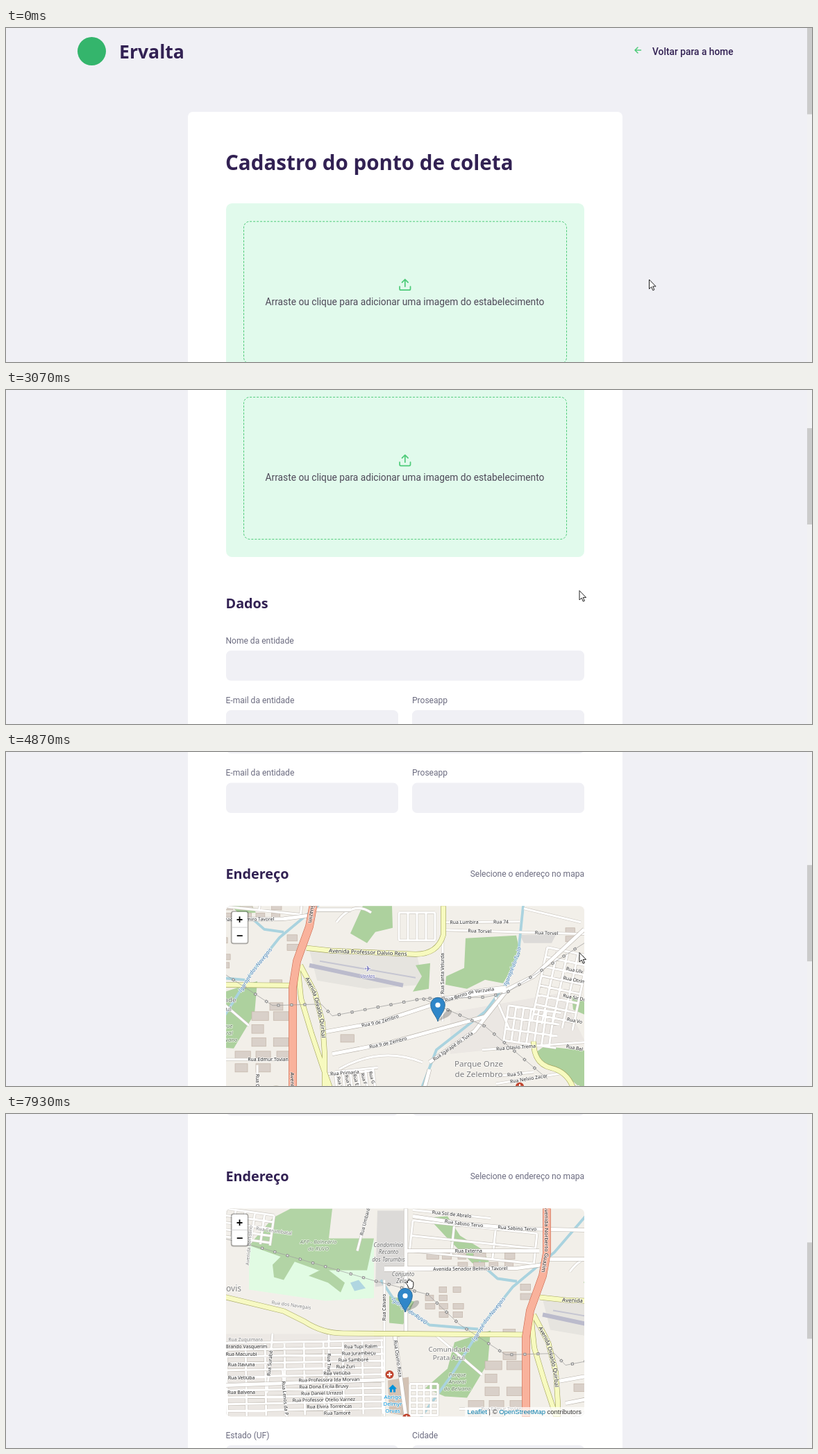
These frames come from a looping animation (1161 px wide and 482 px high, 8000 ms). An HTML page:

```html
<!DOCTYPE html>
<html lang="pt-BR">
<head>
<meta charset="utf-8">
<title>Cadastro do ponto de coleta</title>
<style>
html, body { margin: 0; width: 100%; height: 100%; overflow: hidden; background: #f0f0f5; }
svg { display: block; }
#stage { width: 1161px; height: 482px; }
text { font-family: Roboto, sans-serif; }
.head { font-family: "Noto Sans", sans-serif; font-weight: 700; fill: #322153; }
.h2 { font-size: 19.8px; }
.label { font-size: 12.04px; fill: #6c6c80; }
.line { fill: none; stroke: #4ecb79; stroke-linecap: round; stroke-linejoin: round; }
.field { fill: #f0f0f5; }
.btn { font: 700 15px "DejaVu Sans Mono", monospace; text-anchor: middle; }
.attr { font: 9.46px "Liberation Sans", Arial, sans-serif; text-anchor: end; fill: #333; }
.attr tspan { fill: #0078a8; }
#world text { font-family: "Noto Sans", sans-serif; text-anchor: middle; paint-order: stroke;
  stroke: #fff; stroke-opacity: .75; stroke-width: 1.6px; stroke-linejoin: round; fill: #222; }
#world .area { fill: #777; }
#world .water { fill: #4d80b3; font-style: italic; }
#world .wood { fill: #5f7a57; font-style: italic; }
#world .estate { fill: #666; font-style: italic; }
#world .airport { fill: #6a6ab5; font-style: italic; }
#world .shelter { fill: #0092da; }
#world .plane { font-family: "DejaVu Sans", sans-serif; fill: #7a7ac0; }
</style>
</head>
<body>
<svg id="stage" viewBox="0 0 1161 482">
  <defs>
    <clipPath id="frame"><rect x="317" y="136.5" width="516" height="300" rx="7"/></clipPath>
  </defs>
  <rect width="1161" height="482" fill="#f0f0f5"/>
  <g id="page">
    <circle cx="123.5" cy="33.5" r="20.5" fill="#34b56c"/>
    <text class="head" x="163" y="44" font-size="26.6">Ervalta</text>
    <path class="line" stroke-width="1.5" d="M914.5 32H906M910 28l-4 4 4 4"/>
    <text x="931" y="38.5" font-size="13.76" font-weight="500" fill="#322153">Voltar para a home</text>
    <rect x="262" y="121" width="626" height="1600" rx="7" fill="#fff"/>
    <text class="head" x="316" y="205" font-size="29.6">Cadastro do ponto de coleta</text>
    <rect x="317" y="253" width="516" height="257" rx="8.6" fill="#e1faec"/>
    <rect class="line" x="342.5" y="279.2" width="465" height="205" rx="8.6" style="stroke-linecap:butt" stroke-dasharray="3 2"/>
    <path class="line" stroke-width="2" transform="translate(564.5 360.2) scale(.858)"
      d="M21 15v4a2 2 0 0 1-2 2H5a2 2 0 0 1-2-2v-4M17 8l-5-5-5 5M12 3v12"/>
    <text x="574.5" y="400.3" font-size="13.76" fill="#4e4958" text-anchor="middle">Arraste ou clique para adicionar uma imagem do estabelecimento</text>
    <text class="head h2" x="316.5" y="584">Dados</text>
    <text class="label" x="316.5" y="634.8">Nome da entidade</text>
    <rect class="field" x="317" y="645" width="516" height="43.5" rx="7"/>
    <text class="label" x="316.5" y="720.6">E-mail da entidade</text>
    <text class="label" x="585" y="720.6">Proseapp</text>
    <rect class="field" x="317" y="731" width="248" height="43.5" rx="7"/>
    <rect class="field" x="585" y="731" width="248" height="43.5" rx="7"/>
    <text class="head h2" x="316.5" y="869.5">Endereço</text>
    <text class="label" x="833" y="866.6" text-anchor="end">Selecione o endereço no mapa</text>
    <g transform="translate(0 772.2)">
      <g clip-path="url(#frame)">
        <g id="world"></g>
        <rect id="tile" x="317" y="136" width="213" height="195" fill="#f2efe9"/>
        <g id="pin">
          <path d="M0 0 13-16q8-3 7 3-3 6-9 8z" fill="#000" opacity=".22"/>
          <path d="M0 0C-1.5-7-10.3-14-10.3-24.2a10.3 10.3 0 0 1 20.6 0C10.3-14 1.5-7 0 0z" fill="#2f86c9" stroke="#2e6c97"/>
          <circle cy="-23.6" r="3.6" fill="#fff"/>
        </g>
        <rect x="661" y="423" width="172" height="14" fill="#fff" opacity=".7"/>
        <text class="attr" x="829" y="433"><tspan>Leaflet</tspan> | © <tspan>OpenStreetMap</tspan> contributors</text>
        <rect x="323.8" y="143.5" width="25.6" height="48" rx="4" opacity=".3"/>
        <rect x="325.5" y="145" width="22.3" height="44.6" rx="2.5" fill="#fff"/>
        <path d="M325.5 167.3h22.3" stroke="#ccc" stroke-width=".9"/>
        <text class="btn" x="336.4" y="161.5">+</text>
        <text class="btn" x="336.4" y="183.8">−</text>
      </g>
    </g>
    <text class="label" x="316.5" y="1240.4">Estado (UF)</text>
    <text class="label" x="585" y="1240.4">Cidade</text>
    <rect class="field" x="317" y="1250.2" width="248" height="43.5" rx="7"/>
    <rect class="field" x="585" y="1250.2" width="248" height="43.5" rx="7"/>
  </g>
  <rect x="1154" width="7" height="482" fill="#f1f1f3"/>
  <rect id="thumb" x="1154" width="7" height="139" fill="#cbcbcb"/>
  <g id="cursor" fill="#fff" stroke="#222" stroke-linejoin="round">
    <path id="arrow" d="M.5.5V14l3.1-2.9 2.2 5 2.1-.9-2.2-4.8h4.4z"/>
    <path id="hand" d="M-4 1L-6.5-1.8Q-6-4-4-2.3L-3.5-1.8V-5Q-2.5-6.5-1.5-5V-6Q-.5-7.5.5-6V-5.2Q1.8-6.6 2.6-5V-3.5Q4-4.5 4.8-3V2L3.5 6.5H-1.5z"/>
  </g>
</svg>
<script>
const $ = id => document.getElementById(id);
let seed = 7;
const random = () => (seed = seed * 16807 % 2147483647) / 2147483647;

// --- Map: helpers collect shapes into layers ---
const KINDS = {
  minor: { width: 3, fill: '#fff', edge: '#cbc6bf' },
  main: { width: 5, fill: '#fff', edge: '#b8b2aa' },
  yellow: { width: 6.5, fill: '#f7fabf', edge: '#a3a45c' },
  trunk: { width: 10.5, fill: '#f9b29c', edge: '#cc6a4f' },
  water: { width: 2.6, fill: '#aad3df', edge: '#aad3df' }
};
const paths = { water: '', minor: '', main: '', yellow: '', trunk: '' };
let ground = '', houses = '', labels = '', guides = '', count = 0;

const stroke = (d, color, width, extra = '') =>
  `<path d="${d}" fill="none" stroke="${color}" stroke-width="${width}" stroke-linejoin="round" ${extra}/>`;
const area = (fill, d) => { ground += `<path fill="${fill}" d="${d}z"/>`; };

// Names sit on their street, each at a share of its length
function road(kind, d, ...names) {
  paths[kind] += d;
  if (!names.length) return;
  const id = 'way' + count++;
  const size = kind === 'minor' || kind === 'main' ? 6.9 : 7.9;
  guides += `<path id="${id}" d="${d}"/>`;
  for (const [name, at = 50] of names)
    labels += `<text class="${kind}" font-size="${size}" dy="${size * .35}"><textPath href="#${id}" startOffset="${at}%">${name}</textPath></text>`;
}

function tag(cls, size, x, y, lines, turn = 0) {
  lines.forEach((s, i) => {
    labels += `<text class="${cls}" font-size="${size}" transform="translate(${x} ${y + i * size * 1.27}) rotate(${turn})" y="${size * .35}">${s}</text>`;
  });
}

function grid(x, y, w, h, deg, gapX, gapY) {
  const c = Math.cos(deg * Math.PI / 180), s = Math.sin(deg * Math.PI / 180);
  const at = (u, v) => `${(x + u * c - v * s).toFixed(1)} ${(y + u * s + v * c).toFixed(1)}`;
  for (let u = 0; u <= w; u += gapX) paths.minor += `M${at(u, 0)}L${at(u, h)}`;
  for (let v = 0; v <= h; v += gapY) paths.minor += `M${at(0, v)}L${at(w, v)}`;
}

// Loose rows of buildings inside a box
function build(x, y, w, h, size) {
  for (let u = x; u < x + w; u += size * 1.25)
    for (let v = y; v < y + h; v += size * .75)
      if (random() < .75)
        houses += `<rect x="${u}" y="${v}" width="${size * (.6 + random() * .4)}" height="${size * .5}"/>`;
}

const WOOD = '#add19e', PARK = '#dffce2', GREY = '#dcdad8';
area('#ebe7e3', 'M-200 250H205V600H-200');
area('#ebe7e3', 'M640 290L800 262 833 330 640 350');
area('#e6e4df', 'M437 200L592 208 602 250 520 256 448 244');
area(GREY, 'M199 72H239L240 176 196 182');
area(GREY, 'M740 178H792L786 190H746');
area('#d3c2b4', 'M214 317L244 312 247 369 216 364');
area(PARK, 'M14 116L114 122 194 113V198L124 202 14 186');
area(WOOD, 'M49 82L74 69H134L129 112H194L184 158H114L14 122');
area(WOOD, 'M48 150L70 128 82 142 64 172 50 168');
area(WOOD, 'M100 166L124 154 152 176 146 190 128 176');
area('#aad3df', 'M160 176L172 172 182 184 166 188');
area(WOOD, 'M272 82L300 80 318 108 350 128 360 146 336 148 300 112');
area(WOOD, 'M216 195L252 203 236 236 216 234');
area(WOOD, 'M310 262L362 245 358 292 328 342 296 340 268 328 300 300');
area(WOOD, 'M514 136H556L557 168 532 174 520 190 496 176 506 154');
area(WOOD, 'M662 183L735 179 741 206 716 248 690 243 664 256 633 250 634 238 660 226');
area(WOOD, 'M590 222L611 219 609 256 586 260 599 238');
area(WOOD, 'M775 339L833 345V404L806 380 772 366 763 348');
area(WOOD, 'M815 268L833 274V293L817 286');

build(354, 289, 50, 46, 25);
build(330, 346, 70, 24, 24);
build(380, 243, 26, 36, 22);
build(270, 133, 125, 14, 18);
build(268, 182, 48, 38, 16);
build(405, 178, 16, 18, 18);
build(482, 322, 16, 14, 22);
build(806, 168, 18, 24, 16);
houses += '<rect x="376" y="396" width="26" height="42" rx="12" fill="#c8e3b2"/><rect x="382" y="402" width="14" height="30" rx="7" fill="#d8b98a"/>';

// Neighbourhoods in view, then the outskirts seen when zoomed out
grid(-19, 263, 226, 106, -1, 28, 9.8);
grid(-19, 69, 70, 44, 8, 14, 10);
grid(724, 280, 76, 52, 8, 11, 17);
grid(780, 196, 60, 110, 12, 15, 14);
grid(246, 322, 40, 46, 0, 10, 9);
grid(250, 86, 180, 44, 6, 60, 22);
grid(474, 376, 62, 38, -6, 11, 38);
grid(566, 146, 52, 40, 0, 13, 40);
for (let x = -190; x < 820; x += 148)
  for (const y of [-12, 450]) grid(x, y, 140, 66 + y / 8, random() * 12 - 6, 14 + random() * 10, 12);
for (let y = 60; y < 440; y += 130) grid(-190, y, 160, 118, random() * 10 - 5, 18, 11);

road('water', 'M190 590L240 400 304 312 354 232 394 182 454 132 497 82 560 0', ['Igarapé dos Navegais', 57]);
road('water', 'M204 172L224 202 274 237 344 243', ['Igarapé do RUVO', 37]);
road('water', 'M570 590L600 396 620 344 690 289 720 249 738 204 745 136 748 -20', ['Igarapé do Tuvla', 63]);
road('water', 'M345 146L372 170 400 174');

road('trunk', 'M443 -20V133L437 166 419 216 413 254V590', ['Avenida Norberto Guazim', 21.7], ['Avenida Bertolino', 70.6]);
road('yellow', 'M-195 160L-19 197 64 217 94 232Q120 249 150 249L412 251');
road('yellow', 'M433 197L470 201 590 206Q622 206 630 178V-20', ['Avenida Professor Dalvio Rens', 21.7]);
road('yellow', 'M420 222L425 270 440 320 455 365 480 436 530 590', ['Avenida Só', 54]);
road('yellow', 'M424 222L445 262 456 305 459 350V590', ['Avenida Orvaldo Quirbal', 17.5]);
road('yellow', 'M760 332Q760 364 785 370T818 402L826 440 830 590');

road('main', 'M209 157L400 155 438 150', ['Avenida Senador Belmiro Tavorel', 54]);
road('main', 'M317 155H209M240 -20V249L224 252M-190 330L209 316M443 142H497M632 270L720 258L760 238 833 170M610 372L592 440 560 590');
road('main', 'M224 252L240 369 246 590', ['Rua Osvino Reza', 10]);
road('main', 'M250 80L323 91 402 98 497 100', ['Rua Sabino Tervo', 30], ['Rua Sabino Tervo', 61]);
road('main', 'M240 130H432', ['Rua Externa', 47]);
road('main', 'M460 318L538 304 620 277 672 260 720 254', ['Rua 9 de Zembro', 30], ['Rua Bento de Varzuela', 80]);
road('main', 'M470 350L552 334 690 296 720 260', ['Rua 9 de Zembro', 30]);
road('main', 'M610 362L675 317 720 260', ['Rua Igarapé do Tuvla', 27]);

road('minor', 'M250 71L362 83', ['Rua Sol de Abrelo']);
road('minor', 'M629 303V165', ['Rua Santa Velurda']);
road('minor', 'M632 171L833 177', ['Rua Torvel', 25], ['Rua Torvel', 73]);
road('minor', 'M632 160L740 159', ['Rua Lumbira', 26], ['Rua 74', 75]);
road('minor', 'M686 344L833 333', ['Rua Olavio Trema', 33]);
road('minor', 'M706 382L760 376', ['Rua 53']);
road('minor', 'M706 393L800 378', ['Rua Nelvio Zacor']);
road('minor', 'M612 409L684 403', ['Rua Tomé Vurtes']);
road('minor', 'M608 426L684 420', ['Rua Zilma Porza']);
road('minor', 'M735 405L826 397', ['Rua Belarmio Neto']);
road('minor', 'M480 441L572 407', ['Rua Davi Ruvel Asmor']);
road('minor', 'M462 379L530 374', ['Rua Primaria', 38]);
road('minor', 'M317 358H413', ['Rua Edmur Tovian', 63]);
road('minor', 'M362 366V450', ['Rua Cronista Elvio']);
road('minor', 'M209 369V172', ['Rua Cálvaro', 80]);
road('minor', 'M170 130L192 46', ['Rua Umbaré']);
road('minor', 'M40 335L48 249', ['Rua Surabé']);
road('minor', 'M129 249V369', ['Rua Tivoá', 37]);
road('minor', 'M62 300L70 385', ['Rua Lenos da P']);
road('minor', 'M746 140L828 160M476 160q24-32 50-14M705 268l20 46M480 372q60-34 120-10M280 249l70 60');

tag('area', 11.6, 681, 364, ['Parque Onze', 'de Zelembro']);
tag('area', 9.8, 302, 272, ['Comunidade', 'Prata Azul']);
tag('area', 12, -8, 184, ['ovis']);
tag('area', 6.9, 75, 208, ['Rua dos Navegais'], 8);
tag('area', 6.9, 50, 101, ['Rua Cerumbatal'], 8);
tag('area', 6.9, 14, 122, ['Avenida Bertolino'], -85);
tag('area', 6.9, 9, 258, ['Rua Zuquimara']);
tag('wood', 7.9, 314, 309, ['Parque', 'Arvoral', 'do Belvano']);
tag('wood', 7.7, 114, 117, ['APP - Balneário', 'do RUVO']);
tag('estate', 8, 215, 122, ['Condomínio', 'Recanto', 'dos Tarumbis']);
tag('estate', 8, 236, 164, ['Conjunto', 'Zelaã']);
tag('airport', 7.6, 521, 238, ['Vorlas']);
tag('shelter', 7.9, 221, 341, ['Abrigo', 'Delmyr', 'Orvas']);
['Tupi Ralim', 'Jurambeçu', 'Samboré', 'Zuri', 'Vetiúba', 'Professora Ida Morvan', 'Dona Ercila Bruvy', 'Daniel Urrazol',
  'Professor Otelio Varnez', 'Elvira Torrencas', 'Tamoré'].forEach((name, i) =>
  tag('home', 6.9, 147 + 28 * Math.cos(i * .45), 268 + i * 9.6, ['Rua ' + name], -1));
['Brando Vasquerim', 'Macurubi', 'Itavuna', 'Vetiúba', 'Balvena'].forEach((name, i) =>
  tag('home', 6.9, 3, 268 + 9.8 * i + i * i * 1.7, ['Rua ' + name]));
['Ulv', 'Otrim', 'Sir Du', 'Vo', 'Bel'].forEach((name, i) => tag('home', 6.9, 819, 229 + 14 * i ** 1.5, ['Rua ' + name], 11));
[...'CDEFG'].forEach((name, i) => tag('home', 6.5, 481 + 11.5 * i, 391 - 1.8 * i, ['Rua ' + name], 75));

const clinic = (x, y) => `<circle cx="${x}" cy="${y}" r="6" fill="#c0452f"/>` + stroke(`M${x - 3.5} ${y}h7M${x} ${y - 3.5}v7`, '#fff', 2);
const power = 'M-190 70L29 125 194 173 272 193 317 236 384 280 454 278 470 295 600 270 690 268 720 262 833 190M600 270L690 310 780 386';
const kinds = Object.entries(KINDS);
const layer = ([kind, { width, fill, edge }]) => stroke(paths[kind], edge, width + 1.2) + stroke(paths[kind], fill, width);

$('world').innerHTML = `<defs>${guides}</defs><rect x="-400" y="-200" width="1700" height="1100" fill="#f2efe9"/>`
  + ground + layer(kinds.pop()) + stroke('M437 222L572 251', '#bbbbcc', 6) + stroke('M452 216L590 240', '#c6c6d2', 2)
  + `<g fill="#d9d0c9" stroke="#c4b5a8" stroke-width=".7">${houses}</g>` + kinds.map(layer).join('')
  + stroke(power, '#999', .7) + stroke(power, '#888', 4, 'stroke-dasharray="4 15"')
  + stroke(power, '#eee', 2, 'stroke-dasharray="2 17" stroke-dashoffset="-1"')
  + labels + '<text class="plane" x="521" y="231" font-size="12">✈</text>'
  + clinic(740, 397) + clinic(216.5, 308.5) + clinic(241, 371)
  + '<path d="M215 329l6-6 6 6h-2v5h-3v-4h-2v4h-3v-5z" fill="#0092da"/>';

// --- Motion ---
const LOOP = 8000, STEP = 77, NOTCH = 85.8;
const wheel = [[820, 970], [1520, 1680], [2230, 2370], [3070, 3300], [3380, 3540], [3617, 3770], [4320, 4470], [4640, 4870], [5100, 5250]];
// Map views as [scale, x, y]
const near = [1, 0, 0], far = [.5, 413.5, 145.5], moved = [1, 336, 67.5];

const clamp = k => Math.min(1, Math.max(0, k));
const ease = k => k && 1 / (1 + ((1 - k) / k) ** 1.7);
const out = k => 1 - (1 - k) ** 3;
const mix = (a, b, k) => a.map((v, i) => v + (b[i] - v) * k);

// Progress from a to b in screen refreshes; lead is the share of a step already done at a
function part(t, a, b, lead = 1) {
  if (t < a) return 0;
  const n = Math.round((b - a) / STEP);
  return clamp((Math.floor((t - a) / (b - a) * n + 1e-6) + lead) / (n + lead));
}

function pointer(t) {
  const shown = mix([926, 362.5], [825.5, 289], ease(part(t, 210, 740)));
  const dragged = mix(shown, [532, 254], ease(part(t, 6680, 7070)));
  return mix(dragged, [582, 245.5], ease(part(t, 7690, 7930)));
}

function draw(now) {
  const t = now % LOOP;
  const scroll = NOTCH * wheel.reduce((sum, [a, b]) => sum + ease(part(t, a, b)), 0);
  $('page').setAttribute('transform', `translate(0 ${-scroll})`);
  $('thumb').setAttribute('y', -14.5 + .2588 * scroll);

  const picked = t >= 7230;
  const [s, x, y] = picked ? mix(far, moved, out(part(t, 7230, 7460))) : mix(near, far, out(part(t, 6060, 6290, .04)));
  const [px, py] = picked ? [239, 218.5] : [622, 303];
  $('world').setAttribute('transform', `translate(${x} ${y}) scale(${s})`);
  $('pin').setAttribute('transform', `translate(${px * s + x} ${py * s + y})`);
  $('tile').setAttribute('opacity', t < 7530 ? 0 : .5 - .42 * part(t, 7690, 7930));

  const grab = t >= 6680;
  $('cursor').setAttribute('transform', `translate(${pointer(t)})`);
  $('arrow').style.display = grab ? 'none' : '';
  $('hand').style.display = grab ? '' : 'none';
  requestAnimationFrame(draw);
}
draw(0);
</script>
</body>
</html>
```
